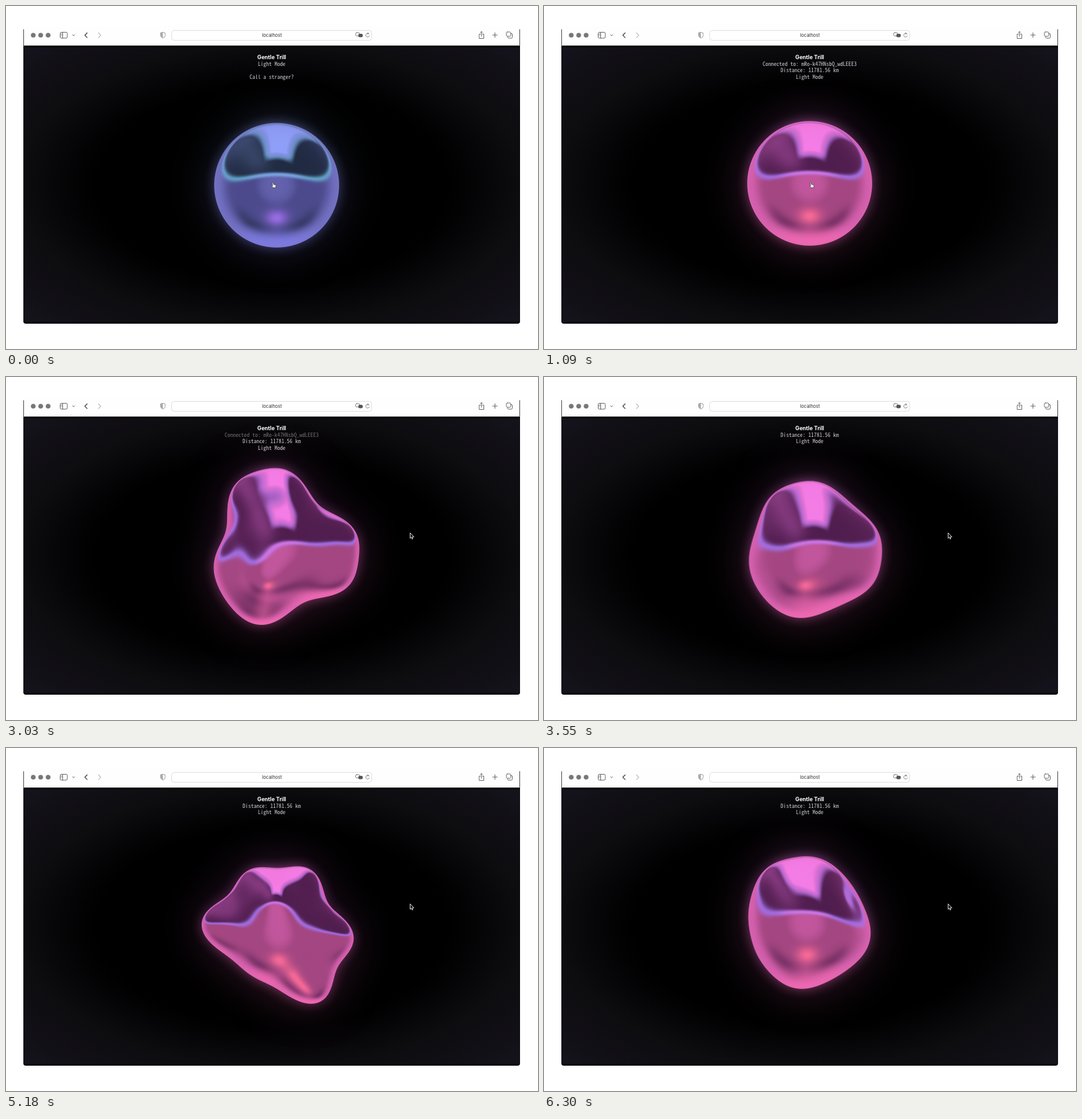
These frames come from a looping animation (859 by 555 pixels, 6.36 s). An HTML page with a canvas:

```html
<!DOCTYPE html>
<html lang="en">
<head>
<meta charset="utf-8">
<title>Voice blob</title>
<style>
html, body { margin: 0; width: 100%; height: 100%; overflow: hidden; background: #fff; }
body { position: relative; }
#page {
  position: absolute; left: 28px; top: 64px; width: 802px; height: 444px;
  border: solid #000; border-width: 3px 0; border-radius: 0 0 4px 4px;
  background: radial-gradient(ellipse 566px 316px at center, #000 50%, #060507 61%, #0d0c0f 72%, #15131c 100%);
}
canvas, svg { position: absolute; left: 0; top: 0; }
#text {
  position: absolute; left: 29px; top: 78px; width: 800px; text-align: center;
  white-space: pre; color: #d0ced3; line-height: 10.6px;
}
h1 { margin: 0; font: 700 8.8px/10.6px Inter, sans-serif; color: #fff; }
#lines { font-family: "Noto Sans Mono CJK JP", "Liberation Mono", monospace; }
</style>
</head>
<body>
<div id="page"></div>
<canvas id="stage" width="859" height="555"></canvas>
<div id="text"><h1>Gentle Trill</h1><div id="lines"></div></div>
<svg width="859" height="555" fill="none" stroke="#666" stroke-linecap="round" stroke-linejoin="round">
  <path d="M29 64V38q0-5 5-5h790q5 0 5 5v26z" fill="#fdfefd" stroke="none"/>
  <path d="M28.5 38v27M829.5 38v27" stroke="#444"/>
  <g fill="#777" stroke="none">
    <circle cx="44" cy="47.3" r="3.8"/><circle cx="56" cy="47.3" r="3.8"/><circle cx="68" cy="47.3" r="3.8"/>
  </g>
  <rect x="87.5" y="42.5" width="11.5" height="9.5" rx="2"/>
  <path d="M91.5 42.5v9.5M89 45h1M89 47h1M107.5 46.5l1.7 1.7 1.7-1.7"/>
  <path d="M131 43.5l-3.7 3.8 3.7 3.8" stroke="#444" stroke-width="1.3"/>
  <path d="M149.3 43.5l3.7 3.8-3.7 3.8" stroke="#bbb" stroke-width="1.2"/>
  <path d="M253.3 42.5l3.7 1.2v4q0 2.5-3.7 4.3-3.7-1.8-3.7-4.3v-4z" stroke="#888" stroke-width=".8"/>
  <path d="M253.3 42.5v9.5q-3.7-1.8-3.7-4.3v-4z" fill="#aaa" stroke="none"/>
  <rect x="267.5" y="39.5" width="323" height="16" rx="4" fill="#fff" stroke="#dedede"/>
  <text x="429.5" y="50.2" text-anchor="middle" font-family="Inter, sans-serif" font-size="7.5" fill="#333" stroke="none">localhost</text>
  <rect x="564.5" y="43" width="6.5" height="5.5" rx="2" stroke-width=".8"/>
  <rect x="569" y="45" width="7" height="5.5" rx="2" fill="#555" stroke="none"/>
  <path d="M586.3 45.5a3 3 0 1 0 .3 3M584 43l1.5 1.4-1.7 1.2" stroke-width=".8"/>
  <path d="M766 45.5h-2v7h7.500v-7h-2M767.7 49v-7.500M765.9 43l1.8-1.800 1.800 1.800M785.8 47h7.500M789.5 43.300v7.500"/>
  <rect x="808" y="42" width="7" height="7" rx="1.5"/>
  <path d="M815 44.5h1q1.500 0 1.500 1.500v4.500q0 1.500-1.500 1.500h-4.500q-1.500 0-1.500-1.500v-1"/>
  <g id="cursor" fill="#111" stroke="#eee" stroke-width=".9">
    <path id="arrow" d="M0-4.500v8.500l2-1.800 1.200 3 1.300-.6-1.200-2.800h2.500z"/>
    <path id="hand" d="M-2.500-4.500q1-.8 1.500.3l.8 2.300 3.300.8q1.200.5.8 1.800l-.5 2.800h-4l-3-3q0-1.200 2 0z" fill="#f4f4f4" stroke="#333" stroke-width=".7"/>
  </g>
</svg>
<script>
const LOOP = 6360, SIDE = 300, HALF = SIDE / 2, SHARP = 10, RAD = Math.PI / 180;
const $ = id => document.getElementById(id);
const ctx = $('stage').getContext('2d');
const buffer = document.createElement('canvas');
buffer.width = buffer.height = SIDE;
const bufferCtx = buffer.getContext('2d');
const image = bufferCtx.createImageData(SIDE, SIDE);

const { exp, abs, sqrt, min, max } = Math;
const lerp = (a, b, k) => a + (b - a) * k;
const ramp = (v, a, b) => {
  const k = min(1, max(0, (v - a) / (b - a)));
  return k * k * (3 - 2 * k);
};

const blue = { dark: '#1a2338', mid: '#384668', fringe: '#68aed4', hi: '#8f9ef8', body: '#4c4a8c', lite: '#7a78cc', hot: '#a070ec', rim: '#8280f2' };
const pink = { dark: '#421642', mid: '#853a80', fringe: '#a574f0', hi: '#f47ce6', body: '#a34681', lite: '#e066b8', hot: '#ff6c98', rim: '#fc6cb0' };
const rgb = hex => [1, 3, 5].map(i => parseInt(hex.slice(i, i + 2), 16));
const ink = {};

function blendInk(k) {
  for (const name in blue) {
    const to = rgb(pink[name]);
    ink[name] = rgb(blue[name]).map((v, i) => lerp(v, to[i], k));
  }
}

// Bumps on the ball: direction on screen in degrees, height, tilt toward the viewer
const pebble = [[224, -.17, 20], [-45, .12], [50, -.05], [172, .05]];
const lobes = [[236, .46], [272, .46], [-12, .4], [26, .4], [106, .4], [136, .25], [166, .25], [121, .2, 50]];
const star = [[4, .5], [58, .6], [188, .55], [245, .38], [296, .42], [265, .25, 45]];
const bean = [[235, .16, 20], [275, .09], [-27, -.12, 20], [18, .08], [100, .1], [168, -.04]];

const key = (time, x, y, size, bumps = []) => ({ time, x, y, size, bumps });
const keys = [
  key(0, 437, 290, 100), key(1090, 429, 287, 100), key(1650, 428, 286, 100), key(2180, 420, 290, 94, pebble),
  key(3030, 445, 280, 85, lobes), key(3900, 429, 283, 100), key(4180, 429, 281, 101),
  key(5180, 440, 300, 80, star), key(6300, 425, 283, 97, bean), key(LOOP, 425, 283, 97, bean)
];

const scaled = (bumps, k) => bumps.map(([angle, height, tilt = 0]) => ({
  x: Math.cos(angle * RAD) * Math.cos(tilt * RAD),
  y: Math.sin(angle * RAD) * Math.cos(tilt * RAD),
  z: Math.sin(tilt * RAD),
  height: height * k
})).filter(b => abs(b.height) > .002);

function blobAt(t) {
  const i = keys.findIndex(k => k.time > t), a = keys[i - 1], b = keys[i];
  const k = ramp(t, a.time, b.time);
  return {
    x: lerp(a.x, b.x, k), y: lerp(a.y, b.y, k), size: lerp(a.size, b.size, k),
    bumps: [...scaled(a.bumps, 1 - k), ...scaled(b.bumps, k)]
  };
}

function distance(x, y, z, bumps) {
  const len = sqrt(x * x + y * y + z * z) || 1e-6;
  let d = len - 1;
  for (const b of bumps) d -= b.height * exp(SHARP * ((x * b.x + y * b.y + z * b.z) / len - 1));
  return d;
}

function normal(x, y, z, bumps) {
  const len = sqrt(x * x + y * y + z * z) || 1e-6;
  const dx = x / len, dy = y / len, dz = z / len;
  let nx = dx, ny = dy, nz = dz;
  for (const b of bumps) {
    const dot = dx * b.x + dy * b.y + dz * b.z;
    const slope = b.height * SHARP * exp(SHARP * (dot - 1)) / len;
    nx -= slope * (b.x - dot * dx);
    ny -= slope * (b.y - dot * dy);
    nz -= slope * (b.z - dot * dz);
  }
  const n = sqrt(nx * nx + ny * ny + nz * nz);
  return [nx / n, ny / n, max(0, nz / n)];
}

const out = [0, 0, 0];
function mix(color, k) {
  for (let i = 0; i < 3; i++) out[i] += (color[i] - out[i]) * k;
}

// Mirror a studio: glowing floor, dark sky, one overhead light
function shade([nx, ny, nz]) {
  const rx = 2 * nz * nx, ry = 2 * nz * ny, rz = 2 * nz * nz - 1;
  const height = ry + .15 + .22 * rz * rz;
  const sky = ramp(height, .05, -.06);
  const lamp = ramp(ry, -.34, -.52) * ramp(rz, .7, .4) * ramp(abs(rx - .06), .46, .18);
  const edge = exp(-((height / .07) ** 2));

  out[0] = ink.body[0]; out[1] = ink.body[1]; out[2] = ink.body[2];
  mix(ink.lite, .7 * ramp(rz, 0, -.8) + .5 * ramp(rz, .7, 1));
  mix(ink.dark, .45 * ramp(ry, .3, .7) * exp(-6 * (abs(rx) - .5) ** 2 - 14 * (rz + .1) ** 2));
  mix(ink.hot, .9 * exp(-(rx * rx + (ry - .9) ** 2 + (rz - .44) ** 2) / .09));
  mix(ink.rim, .8 * ramp(ny, .6, 1));
  mix(ink.dark, sky);
  mix(ink.mid, sky * (.2 + .7 * exp(-((rx + .6) ** 2 + (ry + .75) ** 2) / .14)));
  mix(ink.fringe, 2.6 * lamp * (1 - lamp));
  mix(ink.hi, lamp);
  mix(ink.fringe, .85 * edge);
  mix(ink.hi, .5 * edge * ramp(rz, .4, .9));
  mix(ink.lite, .8 * (1 - nz) ** 3);
}

function renderBlob({ size, bumps }) {
  const { data } = image;
  data.fill(0);
  const reach = 1.02 + min(.65, bumps.reduce((sum, b) => sum + max(0, b.height), 0));
  for (let j = 0; j < SIDE; j++) for (let i = 0; i < SIDE; i++) {
    const x = (i + .5 - HALF) / size, y = (j + .5 - HALF) / size;
    const room = reach * reach - x * x - y * y;
    if (room < 0) continue;
    let z = sqrt(room), near = 9, nearZ = z;
    for (let step = 0; step < 32; step++) {
      const d = distance(x, y, z, bumps);
      if (z < 0 && d > near) break;
      if (d < near) { near = d; nearZ = z; }
      if (d < .003) break;
      z -= max(.6 * d, .004);
    }
    const cover = min(1, 1.3 - near * size);
    if (cover <= 0) continue;
    shade(normal(x, y, nearZ, bumps));
    const at = (j * SIDE + i) * 4;
    for (let c = 0; c < 3; c++) data[at + c] = out[c];
    data[at + 3] = 255 * cover;
  }
  bufferCtx.putImageData(image, 0, 0);
}

function drawBlob(t) {
  const blob = blobAt(t);
  renderBlob(blob);
  ctx.clearRect(0, 0, 859, 555);
  for (const [blur, alpha] of [[36, .34], [9, .5], [0, 1]]) {
    ctx.filter = blur ? `blur(${blur}px)` : 'none';
    ctx.globalAlpha = alpha;
    ctx.drawImage(buffer, blob.x - HALF, blob.y - HALF);
  }
}

const peer = 'Connected to: mRo-k47HNsbQ_wdLEEE3', far = 'Distance: 11781.56 km', mode = 'Light Mode';
const lines = $('lines');
ctx.font = '100px "Noto Sans Mono CJK JP", "Liberation Mono", monospace';
lines.style.fontSize = 447 / ctx.measureText('0').width + 'px';
for (let i = 0; i < 3; i++) lines.append(document.createElement('div'));

function drawText(t) {
  const rows = t < 600 ? [mode, ' ', 'Call a stranger?'] : t < 3400 ? [peer, far, mode] : [far, mode, ''];
  rows.forEach((row, i) => {
    if (lines.children[i].textContent !== row) lines.children[i].textContent = row;
  });
  lines.children[0].style.opacity = t < 3400 ? 1 - ramp(t, 2680, 3400) : 1;
}

function drawCursor(t) {
  const k = ramp(t, 1300, 1850), x = lerp(432, 652.5, k), y = lerp(290.5, 257, k);
  $('cursor').setAttribute('transform', `translate(${x} ${y})`);
  const over = x < 525;
  $('hand').style.display = over ? '' : 'none';
  $('arrow').style.display = over ? 'none' : '';
}

const start = performance.now();
function frame() {
  const t = (performance.now() - start) % LOOP;
  blendInk(ramp(t, 450, 950));
  drawBlob(t);
  drawText(t);
  drawCursor(t);
  requestAnimationFrame(frame);
}
frame();
</script>
</body>
</html>
```
